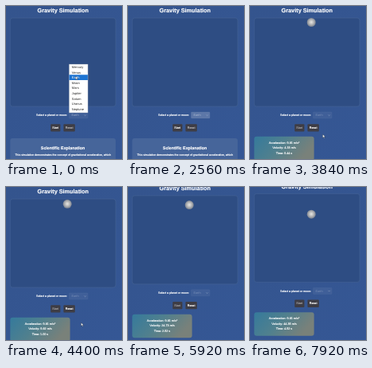
Recreate the animation shown at these times as an HTML page. Size 146 by 192 pixels, loop 8 s.

```html
<!DOCTYPE html>
<html lang="en">
<head>
<meta charset="utf-8">
<title>Gravity Simulation</title>
<style>
html, body { margin: 0; width: 100%; height: 100%; overflow: hidden; background: #34548e; }
svg { display: block; width: 100vw; height: 100vh; }
text { font-family: "Liberation Sans", Arial, sans-serif; font-size: 3.75px; fill: #fff; stroke: #fff; stroke-width: .16px; text-rendering: geometricPrecision; }
.mid { text-anchor: middle; }
.bold { font-weight: bold; }
#list text { fill: #222; stroke: none; font-size: 4px; }
#choice { stroke: none; }
</style>
</head>
<body>
<svg viewBox="0 0 146 192">
  <defs>
    <linearGradient id="sky" x1="0" y1="0" x2="1" y2="1">
      <stop offset="0" stop-color="#34548d"/><stop offset="1" stop-color="#355795"/>
    </linearGradient>
    <linearGradient id="card" x1="0" y1="0" x2="1" y2=".35">
      <stop offset="0" stop-color="#357a9c"/><stop offset=".5" stop-color="#50808e"/><stop offset="1" stop-color="#79817a"/>
    </linearGradient>
    <radialGradient id="metal" cx=".5" cy=".48" r=".54">
      <stop offset="0" stop-color="#e8e7e4"/><stop offset=".5" stop-color="#b6b7b8"/><stop offset="1" stop-color="#737b8a"/>
    </radialGradient>
  </defs>
  <rect width="146" height="192" fill="url(#sky)"/>
  <g id="page">
    <text class="mid bold" x="71.8" y="8.2" style="font-size:7.3px">Gravity Simulation</text>
    <rect x="5.3" y="15" width="132.7" height="111" rx="3" fill="#2e4d83" stroke="#486797" stroke-width=".5"/>
    <circle id="ball" cx="77.2" r="5.5" fill="url(#metal)"/>
    <text x="38" y="138.4" style="font-size:3.6px">Select a planet or moon:</text>
    <g id="select">
      <rect id="field" x="79.3" y="133" width="23.8" height="8" rx="1" fill="#fff" stroke="#7188ae" stroke-opacity=".3" stroke-width=".4"/>
      <text id="choice" x="82.5" y="138.3">Earth</text>
      <path d="M98.4 136.5l1.2 1.2 1.2-1.2" fill="none" stroke="#b4c0d4" stroke-width=".4"/>
    </g>
    <rect x="56.2" y="148.2" width="12.2" height="9.3" rx="1" fill="#3e3d45"/>
    <text id="start" class="mid" x="62.2" y="154">Start</text>
    <rect x="72.4" y="148.2" width="14.4" height="9.3" rx="1" fill="#3e3d45"/>
    <text id="reset" class="mid" x="79.6" y="154">Reset</text>
    <g id="about">
      <rect x="5.3" y="166" width="132.7" height="40" rx="3" fill="#46659a"/>
      <text class="mid bold" x="71.6" y="179.7" style="font-size:5.35px">Scientific Explanation</text>
      <text class="mid" x="71.8" y="188.2" style="font-size:3.55px">This simulation demonstrates the concept of gravitational acceleration, which</text>
    </g>
    <g id="info">
      <rect x="5.3" y="163.8" width="75.3" height="29.6" rx="3" fill="url(#card)"/>
      <text class="mid" x="43" y="172.8">Acceleration: 9.81 m/s²</text>
      <text class="mid" id="speed" x="43" y="179.4"/>
      <text class="mid" id="clock" x="43" y="186"/>
    </g>
    <g id="list">
      <rect x="79.3" y="73" width="23.8" height="61" fill="#fff" stroke="#77889f" stroke-width=".4"/>
      <rect x="79.5" y="86.3" width="23.4" height="6.7" fill="#1c73d2"/>
    </g>
  </g>
  <path id="cursor" d="M0 0v4.2l1-.8 .8 1.5 .7-.3-.8-1.5h1.4z" fill="#fff" stroke="#17212f" stroke-width=".35"/>
</svg>
<script>
const LOOP = 8000, CLOSE = 1520, LAUNCH = 3400, G = 9.81;
const el = id => document.getElementById(id);
const show = (id, on) => el(id).setAttribute("display", on ? "inline" : "none");
const ease = (t, a, b) => {
  const p = Math.min(1, Math.max(0, (t - a) / (b - a)));
  return p * p * (3 - 2 * p);
};

const planets = ["Mercury", "Venus", "Earth", "Moon", "Mars", "Jupiter", "Saturn", "Uranus", "Neptune"];
planets.forEach((name, i) => {
  const label = document.createElementNS("http://www.w3.org/2000/svg", "text");
  label.setAttribute("x", 82.8);
  label.setAttribute("y", 77.9 + i * 6.6);
  label.textContent = name;
  if (name === "Earth") label.style.fill = "#fff";
  el("list").append(label);
});

// Pointer stops: arrival window and position
const stops = [
  [1600, 2400, 61.5, 152.5],
  [3480, 3800, 91.5, 161],
  [4200, 4800, 103, 196]
];

function pointer(t) {
  let x = 87.5, y = 88;
  for (const [a, b, px, py] of stops) {
    const k = ease(t, a, b);
    x += (px - x) * k;
    y += (py - y) * k;
  }
  return `translate(${x} ${y})`;
}

function draw(t) {
  const open = t < CLOSE, running = t >= LAUNCH;
  const hovering = t > stops[0][1] && t < stops[1][0];
  const s = Math.max(0, t - LAUNCH) / 1000;

  show("list", open);
  show("about", !running);
  show("info", running);
  show("ball", running);
  show("cursor", !hovering);
  el("field").setAttribute("fill-opacity", open || running ? .06 : .2);
  el("choice").setAttribute("opacity", running ? .3 : .5);
  el("start").setAttribute("opacity", running ? .5 : 1);
  el("reset").setAttribute("opacity", running ? 1 : .6);

  el("ball").setAttribute("cy", 20.3 + s * s);
  el("speed").textContent = `Velocity: ${(G * s).toFixed(2)} m/s`;
  el("clock").textContent = `Time: ${s.toFixed(2)} s`;

  el("page").setAttribute("transform", `translate(0 ${-6.6 * ease(t, 5640, 6120)})`);
  el("cursor").setAttribute("transform", pointer(t));
}

const begin = performance.now();
function tick() {
  draw((performance.now() - begin) % LOOP);
  requestAnimationFrame(tick);
}
tick();
</script>
</body>
</html>
```
